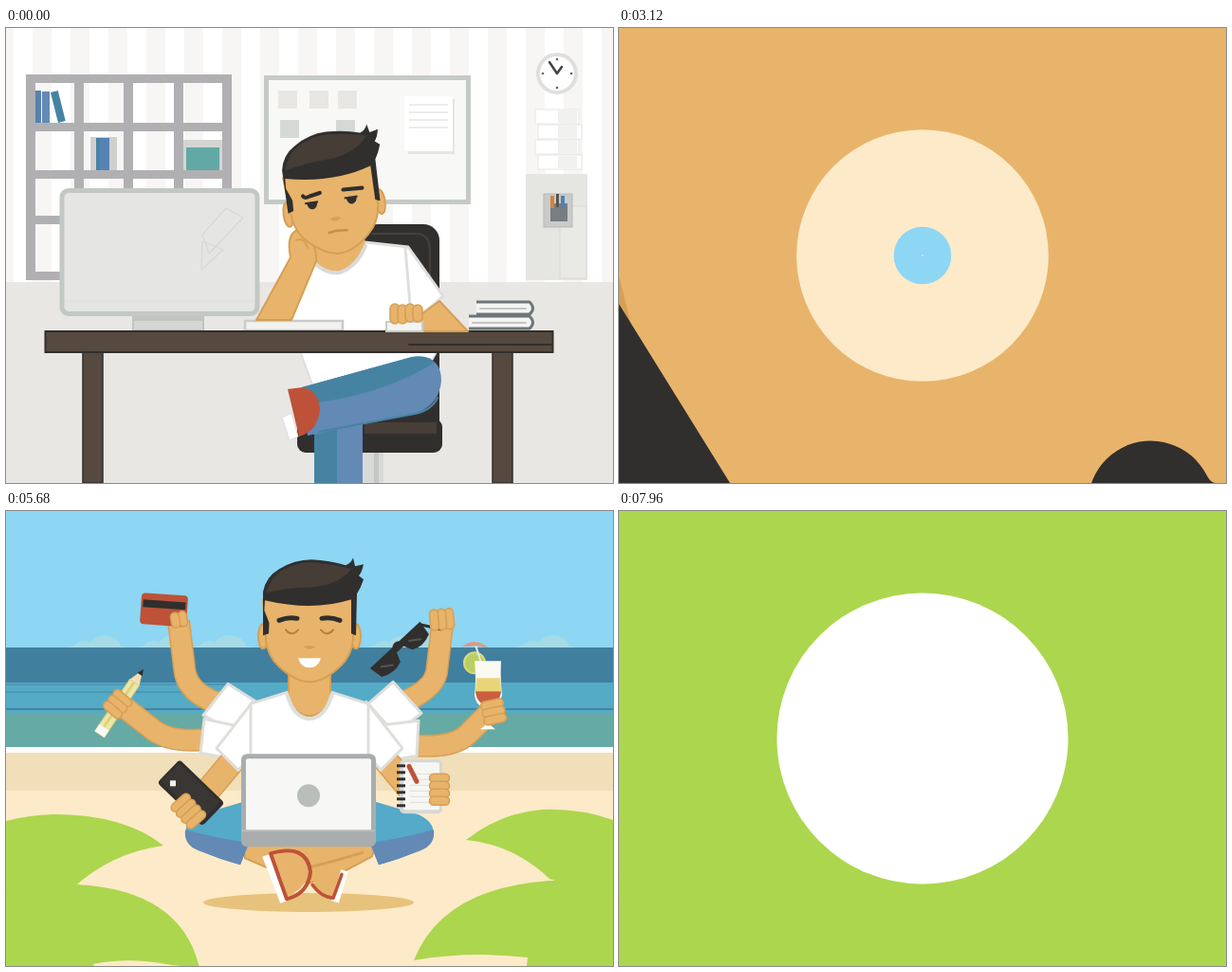
Animation, 640 px wide and 480 px high, one loop 8 s. Source, as an HTML page:

```html
<!DOCTYPE html>
<html lang="en">
<head>
<meta charset="utf-8">
<title>From desk to beach</title>
<style>
html, body { margin: 0; width: 100%; height: 100%; overflow: hidden; background: #fff; }
svg { display: block; width: 100vw; height: 100vh; }
</style>
</head>
<body>
<svg id="stage" viewBox="0 0 640 480"></svg>
<script>
const LOOP = 8000;
const SKIN = '#e8b46b', SKIN_EDGE = '#d69f54', DARK = '#302f2e', WOOD = '#56493f';
const SAND = '#fdeac8', SKY = '#8dd6f4', LEAF = '#acd64d', RED = '#bd5239';
const BLUE = '#6389b5', TEAL = '#4683a3', EDGE = '#dededc';

// Markup helpers
const rect = (x, y, w, h, fill, more = '') =>
  `<rect x="${x}" y="${y}" width="${w}" height="${h}" fill="${fill}" ${more}/>`;
const disc = (x, y, r, fill, more = '') => `<circle cx="${x}" cy="${y}" r="${r}" fill="${fill}" ${more}/>`;
const oval = (x, y, rx, ry, fill, more = '') =>
  `<ellipse cx="${x}" cy="${y}" rx="${rx}" ry="${ry}" fill="${fill}" ${more}/>`;
const shape = (d, fill, edge = 'none', w = 2, more = '') =>
  `<path d="${d}" fill="${fill}" stroke="${edge}" stroke-width="${w}" stroke-linejoin="round" ${more}/>`;
const line = (d, color, w, cap = 'round') =>
  `<path d="${d}" fill="none" stroke="${color}" stroke-width="${w}" stroke-linecap="${cap}" stroke-linejoin="round"/>`;
const group = (id, body, more = '') => `<g ${id ? `id="${id}"` : ''} ${more}>${body}</g>`;
const turn = (a, x, y, body) => `<g transform="translate(${x} ${y}) rotate(${a})">${body}</g>`;
const limb = (d, w) => line(d, SKIN_EDGE, w + 3, 'butt') + line(d, SKIN, w, 'butt');
const repeat = (n, fn) => Array.from({ length: n }, (_, i) => fn(i)).join('');
const fist = (x, y, a, n = 4, w = 20) => turn(a, x, y,
  repeat(n, i => rect(-w / 2, (i - n / 2) * 8, w, 9, SKIN, `rx="4.5" stroke="${SKIN_EDGE}" stroke-width="1.6"`)));

function head(expression) {
  return oval(-49, 1, 5, 13, SKIN, `stroke="${SKIN_EDGE}" stroke-width="2"`) +
    oval(49, 1, 5, 13, SKIN, `stroke="${SKIN_EDGE}" stroke-width="2"`) +
    shape('M-49-38L-46 5Q-44 22-32 33Q-15 49 0 49Q15 49 32 33Q44 22 46 5L48-38Z', SKIN, SKIN_EDGE, 2) +
    shape('M-49 0L-49-46Q-46-62-32-70Q-16-80 2-80Q22-79 38-74Q44-76 46-82L48-73L57-75Q55-66 52-63L57-59Q54-50 50-44L49 0L44-2L44-38Q4-25-47-37L-47.7-26.5L-44.7-19L-42.5-13L-43-2Z', DARK) +
    shape('M-46-45Q-40-62-30-68Q-14-78 4-77Q28-75 44-70Q32-54 4-51Q-22-51-46-45Z', '#453d36') +
    shape('M-6 12Q0 9 6 12Q0 17-6 12Z', SKIN_EDGE) + expression;
}

const tiredEye = x => turn(0, x, -8,
  group('', shape('M-5 0A5 6.5 0 0 0 6 0Z', DARK), 'class="pupil"') + line('M-7 0L7 0', DARK, 2, 'butt'));
const tired = line('M-31-16Q-30-12.8-24-15L-13-17M12-17L32-16', DARK, 4.2) +
  tiredEye(-23) + tiredEye(19) + line('M-9 26Q0 24 10 26', '#c98f48', 2.5);
const smiling = line('M-32-16Q-22-20-13-18M13-18Q22-20 32-16', DARK, 5) +
  line('M-25-6Q-19 2-12-6M12-6Q19 2 25-6', '#b5803d', 2) + shape('M-12 24L12 24Q9 34 0 34Q-9 34-12 24Z', '#fff');

function room() {
  const grey = '#b0b0b3', pale = '#e8e7e4';
  const shelf = [21, 72, 124, 177, 228].map(x => rect(x, 49, 10, 217, grey)).join('') +
    [49, 100, 150, 198, 257].map(y => rect(21, y, 217, 9, grey)).join('');
  const books = rect(31, 66, 6, 34, '#5681ae') + rect(38, 67, 8, 33, BLUE) +
    turn(-14, 47, 68, rect(0, 0, 8, 33, TEAL)) +
    rect(89, 115, 28, 35, '#cfcfce') + rect(95, 116, 14, 34, '#5584b4') + rect(95, 116, 4, 34, TEAL) +
    rect(187, 118, 41, 32, '#d4d5d3') + rect(190, 126, 35, 24, '#62a9a5');
  const notes = [[287, 66], [320, 66], [350, 66], [289, 97], [348, 97]]
    .map(([x, y]) => rect(x, y, 20, 19, y > 90 ? '#d5d9d6' : pale)).join('');
  const board = rect(274.5, 52.5, 213, 131, '#f8f8f7', 'stroke="#c5cac6" stroke-width="5"') + notes +
    rect(424, 75, 49, 58, '#e5e5e3') + rect(420, 72, 51, 58, '#fff') +
    repeat(4, i => rect(425, 80 + i * 8, 41, 2, '#ececea'));
  const clock = disc(581, 48, 20, '#fff', 'stroke="#dfdfdd" stroke-width="4"') +
    [0, 90, 180, 270].map(a => turn(a, 581, 48, disc(0, -15, 1.3, '#666'))).join('') +
    line('M573 36L581 48L586 41', '#444', 2.5);
  const cabinet = repeat(4, i => rect(558 + i % 2 * 3, 86 + i * 16, 46, 15, '#fff', 'stroke="#e6e6e4"') + rect(582, 87 + i * 16, 20, 13, '#f0f0ee')) +
    rect(548, 154, 65, 112, '#e5e5e2') + rect(584, 188, 28, 76, '#e9e9e6', 'stroke="#dadad7"') +
    rect(567, 175, 30, 35, '#c9cbca', 'stroke="#b6b9b7"') + rect(574, 185, 18, 19, '#777d80') +
    rect(574, 177, 4, 13, '#d3843d') + rect(580, 175, 3, 14, '#555') + rect(585, 177, 4, 13, '#527faf');
  return rect(0, 0, 640, 268, '#f7f6f5') + repeat(16, i => rect(8 + i * 40, 0, 20, 268, '#fff')) +
    rect(0, 268, 640, 212, pale) + shelf + books + board + clock + cabinet;
}

function desk() {
  const book = (x, y, color) => shape(`M${x} ${y}L552 ${y}Q559 ${y + 7} 552 ${y + 13}L${x} ${y + 13}`, '#f4f4f2', color, 3);
  return rect(134, 304, 74, 15, '#d3d6d3', 'stroke="#bfc4c0" stroke-width="2"') + rect(134, 304, 74, 5, '#c0c5c1') +
    rect(59, 171.5, 206, 130, '#e5e5e3', 'rx="7" stroke="#c2c8c4" stroke-width="5"') +
    line('M62 288L262 288', '#dededb', 1) +
    shape('M232 190L250 200L214 238L207 218ZM207 225L229 234L206 255Z', 'none', '#d7d8d5', 1.2) +
    rect(252, 309, 103, 10, '#f2f2f0', 'stroke="#c9ccca" stroke-width="2.5"') +
    book(496, 289, '#6c777b') + book(488, 304, '#6c777b') + line('M500 296L548 296M492 311L548 311', '#c4c6c5', 2) +
    rect(81, 340, 21, 140, WOOD, `stroke="${DARK}" stroke-width="1.5"`) +
    rect(513, 340, 21, 140, WOOD, `stroke="${DARK}" stroke-width="1.5"`) +
    rect(41.5, 320, 535, 22, WOOD, `stroke="${DARK}" stroke-width="2"`) + line('M425 334L576 334', DARK, 2);
}

function worker() {
  const chair = rect(374, 440, 24, 40, '#d9dad8') + rect(388, 440, 5, 40, '#c4c7c4') +
    rect(375, 207, 82, 235, DARK, 'rx="17"') + line('M386 217L435 217Q447 219 447 235L447 400', '#45413d', 2) +
    rect(307, 412, 153, 36, DARK, 'rx="9"') + rect(378, 416, 76, 12, '#473e37');
  const legs = shape('M309 338L456 338L430 385L325 382Z', '#fff', EDGE, 2) +
    rect(325, 412, 51, 68, BLUE) + rect(325, 412, 24, 68, TEAL) +
    shape('M312 379L428 347Q459 344 459 372Q457 398 431 407L318 430Z', BLUE) +
    shape('M312 379L428 347Q445 344 452 353Q400 385 330 395Z', TEAL) + line('M330 426L431 407Q449 403 455 390', TEAL, 2) +
    shape('M291 411L301 406L308 431L299 435Z', '#fff', EDGE, 1) +
    shape('M297 381L313 379Q330 383 331 402Q329 425 309 431Z', RED);
  const torso = shape('M298 322L304 285L318 244L342 226L378 226L424 231L461 283L441 300L440 322Z', '#fff', EDGE, 3) +
    shape('M327 222L378 220L379 232Q364 258 346 258Q332 257 326 247Z', SKIN) +
    line('M325 248Q338 260 352 258Q370 252 379 230', '#dadad8', 4) + line('M421 232L426 292', EDGE, 3);
  const rightArm = shape('M457 288L487 320L434 320L438 302Z', SKIN, SKIN_EDGE, 2) +
    rect(401, 310, 38, 10, '#f3f3f1', 'stroke="#c9ccca" stroke-width="2"') +
    repeat(4, i => group('', rect(405 + i * 8, 291 + i % 2, 10, 21 - i, SKIN, `rx="5" stroke="${SKIN_EDGE}" stroke-width="1.6"`), 'class="tap"'));
  const leftArm = shape('M300 242L264 308L301 308L327 246Q328 222 308 213Q295 217 300 242Z', SKIN, SKIN_EDGE, 2) +
    line('M306 224Q314 220 318 232', SKIN_EDGE, 2);
  return { back: chair + legs + group('torso', torso), front: group('leftArm', leftArm) + group('officeHead', head(tired)) + rightArm };
}

function beach() {
  const cloud = x => oval(x - 8, 147, 34, 7, '#a4dbe6') + oval(x, 144, 17, 13, '#a4dbe6') + oval(x - 22, 144, 10, 7, '#a4dbe6');
  return rect(0, 0, 640, 146, SKY) + [104, 177, 236, 420, 446, 577].map(cloud).join('') +
    rect(0, 144, 640, 38, '#417f9f') + rect(0, 181, 640, 33, '#54abc6') +
    line('M0 183L235 183M0 191L210 191', TEAL, 1) + rect(0, 208, 640, 2, TEAL) +
    rect(0, 213, 640, 37, '#65aaa5') + rect(0, 249, 640, 6, '#fff') +
    rect(0, 255, 640, 40, '#f0dfb9') + rect(0, 295, 640, 185, SAND);
}

function extraArms() {
  const sleeve = d => shape(d, '#fff', EDGE, 3);
  const card = turn(4, 167, 104.5, rect(-25, -17, 49, 33, RED, 'rx="4"') + rect(-23, -10, 45, 8, DARK));
  const pencil = turn(-56, 121, 202, rect(-40, -6, 66, 12, '#efe6a4', 'stroke="#d8c984"') +
    rect(-40, -6, 9, 12, '#f8f8f5') + rect(-31, -2, 57, 3, '#dfd07c') + shape('M26-6L42 0L26 6Z', '#f6dfb2') + shape('M36-3L43 0L36 3Z', DARK));
  const shades = turn(-43, 417, 147, shape('M-37-9L-5-9Q0-13 5-9L35-9L33 7Q20 13 9 7L5-2L-5-2L-9 8Q-22 13-34 6Z', DARK) +
    line('M33-7L46 12', DARK, 3) + line('M-27-2L-17 5M13-2L23 5', '#555', 2));
  const drink = disc(494, 160, 11, '#b9cf62', 'stroke="#d9d977" stroke-width="2"') + line('M495 141L505 172', '#e9e9e6', 2) +
    shape('M481 143Q493 132 509 144L495 142Z', '#dc9b86') +
    shape('M494 158L522 158Q521 178 523 194Q521 205 511 208L511 226L516 230L500 230L505 226L505 208Q495 205 494 194Q496 178 494 158Z', '#fbfaf2') +
    shape('M496 176L521 176L522 190L495 190Z', '#e9d578') + shape('M495 190L522 190Q521 203 508 205Q496 203 495 190Z', '#ca5f3e');
  return group('armUL', limb('M232 205Q190 194 188 165L182 116', 21) + card + fist(183, 114, 80, 2, 16) + sleeve('M234 182L264 201L243 235L208 215Z')) +
    group('armUR', limb('M410 205Q450 190 454 170L461 112', 21) + shades + fist(460, 114, 85, 3, 22) + sleeve('M408 180L438 213L410 235L382 203Z')) +
    group('armML', limb('M218 240Q172 246 152 228L116 200', 21) + pencil + fist(118, 203, 40, 3, 23) + sleeve('M209 219L250 228L243 262L205 255Z')) +
    group('armMR', limb('M420 246Q470 252 487 235L514 208', 21) + drink + fist(514, 211, -12, 3, 24) + sleeve('M393 226L435 221L433 258L398 264Z'));
}

function guru() {
  const mirror = body => body + `<g transform="translate(640 0) scale(-1 1)">${body}</g>`;
  const knee = shape('M252 306L205 320Q184 330 191 347Q201 360 247 373L258 346Z', '#54aac8') +
    shape('M189 336Q187 352 203 358Q225 367 247 373L256 350Q218 344 189 336Z', BLUE);
  const shins = shape('M250 350L390 350L386 364L358 379L320 392L285 380L252 366Z', SKIN, SKIN_EDGE, 2) +
    line('M292 382Q330 374 376 360', SKIN_EDGE, 3);
  const feet = shape('M282 360Q312 354 319 378Q318 398 296 406Z', SKIN) + line('M274 363L293 412', '#fff', 8, 'butt') +
    line('M279 361Q317 350 321 380Q319 403 296 409Z', RED, 4) +
    shape('M326 382L356 380L345 408Q330 404 324 396Z', SKIN) + line('M357 379L347 412', '#fff', 8, 'butt') +
    line('M323 394Q332 407 345 408L354 383', RED, 3.5);
  const sleeves = mirror(limb('M246 255L205 304', 24) + shape('M260 201L222 250L245 273L262 252Z', '#fff', EDGE, 3));
  const shirt = shape('M296 191L258 203L258 270L382 270L382 203L344 191Z', '#fff', EDGE, 3) +
    shape('M298 168L342 168L342 200Q332 216 320 216Q308 216 298 200Z', SKIN, SKIN_EDGE, 2) +
    line('M296 192Q303 218 320 219Q337 218 344 192', EDGE, 4);
  const phone = turn(44, 195, 297, rect(-33, -17, 66, 34, DARK, 'rx="4"') + rect(-31, -14, 60, 27, '#393634', 'rx="2"')) +
    rect(173, 284, 6, 6, '#f2f2f0') + fist(192, 316, -42, 4, 24);
  const pad = rect(415, 262, 45, 57, '#d6d8d6', 'rx="5"') + rect(419, 265, 38, 50, '#f6f6f3', 'rx="2"') +
    repeat(6, i => line(`M426 ${277 + i * 6}L450 ${277 + i * 6}`, '#dededb', 1)) +
    repeat(7, i => rect(412, 267 + i * 7, 9, 3, DARK)) + line('M425 269L433 285', RED, 5) + fist(457, 293, 0, 4, 21);
  const laptop = rect(248, 256, 142, 98, '#aaadae', 'rx="6"') + rect(253, 261, 132, 76, '#f7f7f6', 'rx="2"') +
    disc(319, 300, 12, '#babebb') + line('M250 337L388 337', '#b9bcbc', 2);
  return group('extra', extraArms()) + sleeves + shirt + shins + mirror(knee) + feet + laptop + phone + pad +
    turn(0, 320, 131, head(smiling));
}

const leaves =
  group('leafLU', shape('M-60 360Q-20 322 50 320Q125 320 166 353Q112 360 70 398L-60 440Z', LEAF)) +
  group('leafRU', shape('M700 360Q640 312 565 315Q520 319 485 347Q535 352 573 388L700 430Z', LEAF)) +
  group('leafLD', shape('M-60 420Q0 393 75 394Q185 400 204 482L175 479Q130 470 92 478L120 560L-60 560Z', LEAF)) +
  group('leafRD', shape('M700 420Q650 388 573 390Q460 398 430 474Q490 464 550 471L540 560L700 560Z', LEAF));

const man = worker();
document.getElementById('stage').innerHTML =
  '<clipPath id="port"><circle id="portHole" cx="320" cy="240" r="0"/></clipPath>' +
  group('office', room() + man.back + desk() + man.front) +
  [['sandRing', SAND], ['skyRing', SKY], ['whiteRing', '#fff']].map(([id, c]) => disc(320, 240, 0, c, `id="${id}"`)).join('') +
  group('beach', beach() + oval(319, 413, 111, 10, '#e7c27c', 'id="shadow"') + group('guru', guru()) + leaves, 'clip-path="url(#port)"') +
  disc(320, 240, 0, LEAF, 'id="greenRing"') + disc(320, 240, 0, '#fff', 'id="lastRing"');

// Motion
const el = id => document.getElementById(id);
const all = name => [...document.querySelectorAll('.' + name)];
const pupils = all('pupil'), fingers = all('tap');
const move = (id, value) => el(id).setAttribute('transform', value);
const span = (t, from, length) => Math.min(1, Math.max(0, (t - from) / length));
const inOut = (p, n) => p < .5 ? (2 * p) ** n / 2 : 1 - (2 - 2 * p) ** n / 2;
const backOut = p => 1 + 2.2 * (p - 1) ** 3 + 1.2 * (p - 1) ** 2;
const wave = (t, peak, period) => Math.cos(2 * Math.PI * (t - peak) / period);

// Iris circles: id and start time
const rings = [['sandRing', 2742], ['skyRing', 2859], ['whiteRing', 3020], ['portHole', 3100], ['greenRing', 7328], ['lastRing', 7568]];
// Extra arms: id, shoulder, folded angle, start time, sway
const arms = [['armUL', 245, 215, -70, 4060, -4], ['armUR', 395, 215, 70, 4060, 1.8],
  ['armML', 245, 235, -50, 4240, 6], ['armMR', 395, 235, 50, 4240, 2]];
// Leaves: id, pivot, hidden offset, start time, sway
const fronds = [['leafLU', 0, 420, -260, 4260, -5.5], ['leafRU', 640, 420, 260, 4340, 1.2],
  ['leafLD', 0, 380, -270, 4400, -4], ['leafRD', 640, 520, 270, 4480, .5]];

function drawOffice(t) {
  const nod = inOut(span(t, 1720, 720), 2);
  const blink = 1 - .9 * Math.max(0, 1 - Math.abs(t - 420) / 120);
  const breath = (1 - wave(t, 0, 1680)) / 2;
  move('officeHead', `translate(${346 - 5 * nod} ${189 + 2 * nod}) rotate(${-8 - 2 * nod})`);
  move('leftArm', `rotate(${-1.5 * nod} 283 308)`);
  move('torso', `translate(0 ${-.8 * breath})`);
  pupils.forEach(p => p.setAttribute('transform', `scale(1 ${(1 - .6 * nod) * blink})`));
  fingers.forEach((f, i) => {
    const lift = t < 1700 ? Math.max(0, Math.sin(2 * Math.PI * (t / 840 - i * .12))) * 3 : 0;
    f.setAttribute('transform', `translate(0 ${-lift})`);
  });
  const zoom = 1 + 30.5 * inOut(span(t, 2540, 580), 3);
  move('office', `translate(299.4 170.1) scale(${zoom}) translate(-299.4 -170.1)`);
}

function drawBeach(t) {
  const bob = -4 * wave(t, 6320, 1680) - 2.6;
  move('guru', `translate(0 ${bob})`);
  el('shadow').setAttribute('rx', 110.5 + 1.5 * bob);
  const sway = (1 - wave(t, 5680, 2720)) / 2;
  for (const [id, x, y, fold, start, amount] of arms) {
    const p = span(t, start, 640), grow = p ? backOut(p) : 0;
    const angle = fold * (1 - grow) + amount * sway;
    move(id, `translate(${x} ${y}) rotate(${angle}) scale(${Math.max(.01, grow)}) translate(${-x} ${-y})`);
  }
  for (const [id, x, y, away, start, amount] of fronds) {
    const hidden = 1 - backOut(span(t, start, 700));
    move(id, `translate(${away * hidden} ${130 * hidden}) rotate(${amount * sway} ${x} ${y})`);
  }
}

function draw(t) {
  drawOffice(t);
  drawBeach(t);
  for (const [id, start] of rings) el(id).setAttribute('r', 420 * inOut(span(t, start, 850), 4));
}

const begin = performance.now();
function tick() {
  draw((performance.now() - begin) % LOOP);
  requestAnimationFrame(tick);
}
tick();
</script>
</body>
</html>
```
